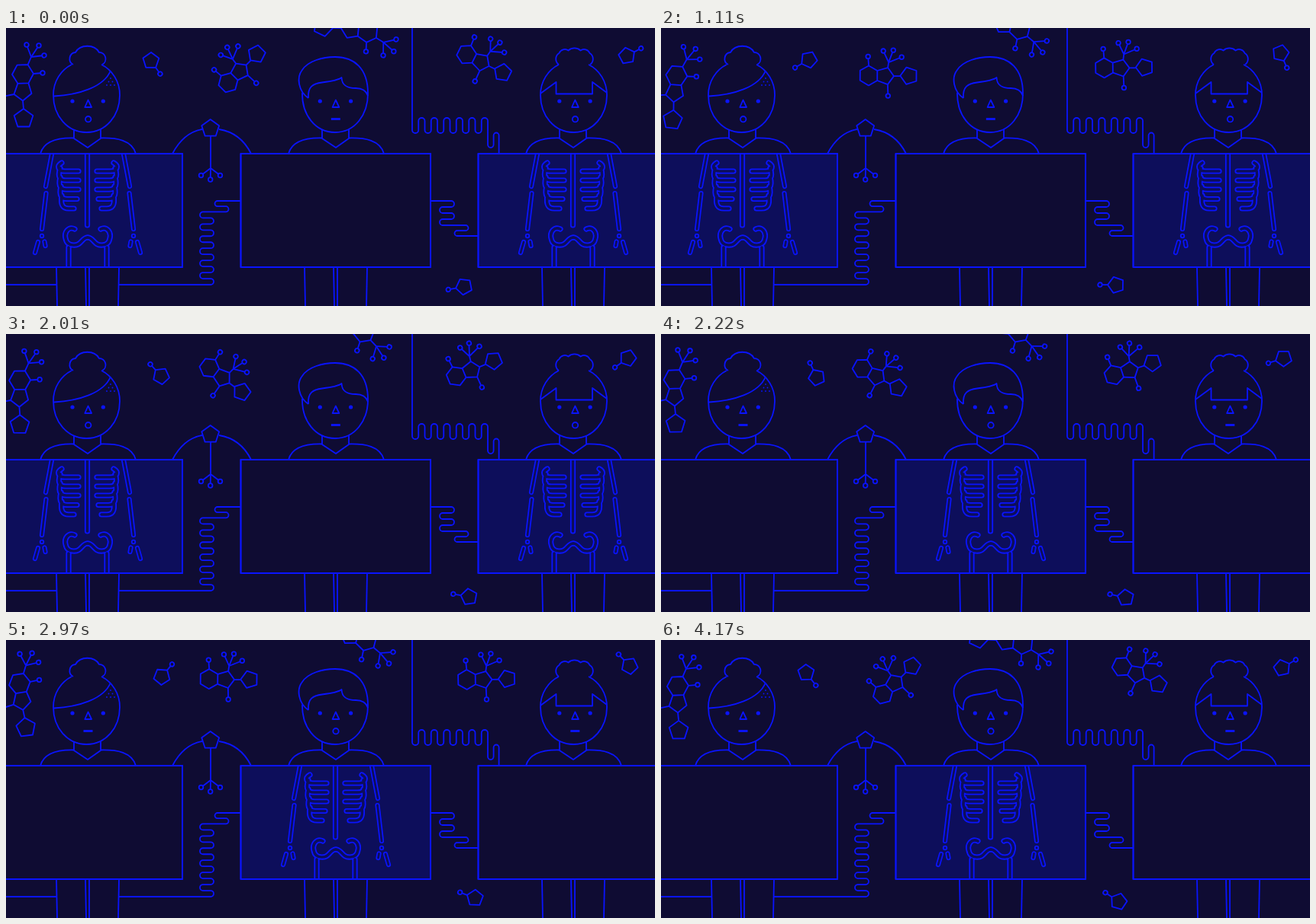
Write an HTML page that moves like this. It is 850 by 365 pixels and loops after 4200 ms.

```html
<!DOCTYPE html>
<html lang="en">
<head>
<meta charset="utf-8">
<title>X-ray line-up</title>
<style>
  html, body { margin: 0; width: 100%; height: 100%; overflow: hidden; background: #0f0c33; }
  svg {
    --ink: #0a14ff; --night: #0f0c33; --glow: #0d0e5b;
    --pane: var(--night); --on: hidden; --off: visible;
    display: block; width: 850px; height: 365px;
    fill: none; stroke: var(--ink); stroke-width: 1.8; stroke-linejoin: round;
  }
  /* custom properties reach into <use> copies, descendant selectors do not */
  .lit { --pane: var(--glow); --on: visible; --off: hidden; }
  .panel { fill: var(--pane); }
  .bones, .open { visibility: var(--on); }
  .shut { visibility: var(--off); stroke-width: 2.8; }
  .node { fill: var(--night); }
  .dot { fill: var(--ink); stroke: none; }
  .bones { stroke-linecap: round; }
  .outer { stroke-width: 7.2; }
  .inner { stroke: var(--glow); stroke-width: 3.6; }
  .fingers .outer { stroke-width: 6.2; }
  .fingers .inner { stroke-width: 2.8; }
</style>
</head>
<body>
<svg viewBox="0 0 850 365">
  <defs>
    <clipPath id="screen"><path d="M-17.5 165H231V314H-17.5Z"/></clipPath>

    <path id="ribs" d="M73 177C66 181 68 188 77 188H95
      M71 184C67 196 71 200 78 200H95M71 196C68 208 72 212 79 212H95
      M72 208C69 220 73 224.5 80 224.5H93M73 220C71 233 75 237 82 237H89"/>
    <path id="hip" d="M90 264C82 260 76 268 78 276C79 282 82 285 88 285C99 286 99 275 107 275M82 288V318"/>
    <path id="arm" d="M61 160L52 208M52.5 217L47 264"/>
    <path id="hand" d="M42 281L38 295M50.5 280.5L51.5 286"/>
    <path id="spine" d="M106.5 155V259"/>

    <g id="half">
      <use href="#ribs" class="outer"/><use href="#ribs" class="inner"/>
      <g class="fingers">
        <use href="#arm" class="outer"/><use href="#arm" class="inner"/>
        <use href="#hand" class="outer"/><use href="#hand" class="inner"/>
      </g>
      <circle cx="47" cy="273" r="2.3"/>
    </g>
    <g id="hips"><use href="#hip"/><use href="#hip" transform="matrix(-1 0 0 1 214 0)"/></g>
    <g id="skeleton" clip-path="url(#screen)">
      <use href="#half"/>
      <use href="#half" transform="matrix(-1 0 0 1 214 0)"/>
      <use href="#hips" class="outer"/><use href="#hips" class="inner"/>
      <use href="#spine" class="outer"/><use href="#spine" class="inner"/>
    </g>

    <g id="body">
      <path d="M89 133V145L107 157L124 145V133M89 144.5C70 144 50 147 45 165M124 144.5C145 144 165 147 170 165"/>
      <path d="M66 314L67 365M104 314L105 365M109 314V365M148 314L147 365"/>
      <path class="panel" d="M-17.5 165H231V314H-17.5Z"/>
      <use href="#skeleton" class="bones"/>
      <path d="M-17.5 165H231V314H-17.5Z"/>
    </g>
    <g id="face">
      <circle class="dot" cx="87" cy="96" r="2.6"/>
      <circle class="dot" cx="127.3" cy="96" r="2.6"/>
      <path d="M107.5 94.5L103.3 104H112Z"/>
      <path class="shut" d="M101.5 119.5H113.5"/>
      <circle class="open" cx="107.7" cy="119.7" r="3.7"/>
    </g>
    <path id="head" d="M86 48C72 55 62 70 62 88C62 115 80 137 105.5 137C131 137 149 115 149 88C149 70 139 55 125 48"/>
  </defs>

  <g id="molecules"></g>

  <!-- wires -->
  <path id="coil"/>
  <path id="stack"/>
  <path d="M0 337H66M307 227H277a3.5 3.6 0 0 0 0 7.2H288a3.5 3.6 0 0 1 0 7.2H258"/>
  <path d="M556 227H583a4 4 0 0 1 0 8H572a4 4 0 0 0 0 8H583a4 4 0 0 1 0 8H572a4 4 0 0 0 0 8H602a3.5 3.5 0 0 1 0 7H591a3.5 3.5 0 0 0 0 7H618"/>
  <path d="M218 165C228 146 240 136 257 133M279 133C298 136 312 147 321 165"/>
  <g id="lamp"></g>

  <!-- people -->
  <g class="side">
    <use href="#body"/>
    <use href="#head"/>
    <use href="#face"/>
    <path d="M88 48A8.5 8.5 0 0 1 91 32A17 14 0 0 1 122 32A8.5 8.5 0 0 1 126 48M63 89.5C94 88 128 78 137 56"/>
    <g id="freckles"></g>
  </g>
  <g class="middle">
    <use href="#body" x="325"/>
    <use href="#face" x="324.3"/>
    <path d="M396 92C383 83 380 65 388 55C396 43 415 38 431 38C456 38 474 53 474 86C474 114 457 137 431 137C405 137 387.5 114 388 85"/>
    <path d="M396 92C395 77 402 73 414 71.5C426 70 436 68 439.5 65C440 77 449 79 458 79C467 79 472 83 474 89"/>
  </g>
  <g class="side">
    <use href="#body" x="636"/>
    <use href="#head" x="638"/>
    <use href="#face" x="637.8"/>
    <path d="M724 48A9 9 0 0 1 724.5 33A8 8 0 0 1 736.5 29.5A12 12 0 0 1 752.5 29.5A8 8 0 0 1 764.5 33A9 9 0 0 1 765 48"/>
    <path d="M700 86L720.5 71V86.5H768V71L787 85"/>
  </g>
</svg>
<script>
const LOOP = 4200, STEP = 30, HALF = 2000;
const TIMES = [0, 540, 1110, 1680, 2220, 2970, 3540];
const $ = id => document.getElementById(id);

// ---- drawing helpers ----
const line = d => `<path d="${d}"/>`;
const node = (x, y) => `<circle class="node" cx="${x}" cy="${y}" r="2.8"/>`;
const bond = (x1, y1, x2, y2) => line(`M${x1} ${y1}L${x2} ${y2}`) + node(x2, y2);
function ring(n, cx, cy, r, deg) {
  const pts = Array.from({ length: n }, (_, i) => {
    const a = (deg + i * 360 / n) * Math.PI / 180;
    return (cx + r * Math.cos(a)).toFixed(2) + ' ' + (cy + r * Math.sin(a)).toFixed(2);
  });
  return line('M' + pts.join('L') + 'Z');
}

const chain =
  bond(0, 0, -6, -16) + bond(0, 0, 10, -15) + bond(0, 0, 17, -2) +
  line('M0 0L-4.4 10.1') + ring(6, -11, 22.5, 14, -62) + bond(3, 22, 15, 21) +
  line('M-3.6 34.4L.5 48L-11 57.5L-22.5 49L-17.6 34.9M-22.5 49L-40 52.5M-11 57.5L-10 68') +
  ring(5, -10, 81, 13, -90);

const cluster =
  ring(6, -26, 0, 13, -90) + bond(-26, -13, -27, -25) +
  line('M-14.7 -6.5L-1 -10.5L7 .5L-1 11.5L-14.7 6.5M-1 -10.5L0 -17.5M7 .5H15.5') +
  bond(0, -17.5, -7, -32.5) + bond(0, -17.5, 6, -33.5) + bond(0, -17.5, 17, -24.5) +
  bond(-1, 11.5, -0.5, 26.5) + ring(5, 27, 0, 11.7, 180);

const drop = ring(5, -5.5, 0, 11, 0) + bond(5.5, 0, 15.5, 0);

// ---- molecules: shape, x and y at TIMES, angle as straight runs between [time, degrees] ----
const swing = (a, b) => [[0, a], [HALF, b], [LOOP, a]];
const spin = (from, turn) => [[0, from], [LOOP, from + turn]];
const wander = [[193, 186, 189, 195.8, 201.7, 207.6, 200.5], [47.5, 50.4, 44.3, 48.3, 52, 43.8, 42]];
const molecules = [
  { shape: chain, x: [33, 34.2, 33.7, 31.8, 28.2, 26, 30], y: [38, 41, 41.3, 40.7, 36.9, 33.4, 34.8],
    angle: [[0, 0], [1300, 7.2], [2980, -7.2], [LOOP, 0]] },
  { shape: chain, x: [494.3, 491.5, 488.3, 485.1, 485.5, 490, 492.7], y: [18.8, 18.7, 18.2, 17.1, 15.8, 17.1, 18.1],
    angle: swing(97.7, 113.2) },
  { shape: cluster, x: [309.3, 304.8, 298, 290.2, 286.4, 292, 300.7], y: [53.3, 59, 62.6, 62.7, 57.7, 51.5, 50],
    angle: swing(-45.2, 37) },
  { shape: cluster, x: [626.5, 617.5, 606.5, 607.6, 618, 629.5, 637.2], y: [46.4, 51.4, 52, 45.9, 45.9, 51.5, 49.9],
    angle: swing(26.5, -22.7) },
  { shape: drop, x: wander[0], y: wander[1], angle: spin(55, 360) },
  { shape: drop, x: wander[0].map(v => v + 401.5), y: wander[1].map(v => v + 293), angle: spin(169, 45) },
  { shape: drop, x: [818, 816.8, 813.7, 810.7, 810.2, 813, 816.2], y: [34, 36.9, 38, 36.6, 33.5, 30.1, 30.6],
    angle: spin(-28, 360) }
];
$('molecules').innerHTML = molecules.map(m => `<g>${m.shape}</g>`).join('');
const groups = [...$('molecules').children];

// ---- static repeats ----
let coil = 'M532 0V134';
for (let i = 0; i < 6; i++) {
  coil += 'a4.125 4 0 0 0 8.25 0V122a4.125 4 0 0 1 8.25 0V' + (i < 5 ? 134 : 153);
}
$('coil').setAttribute('d', coil + 'a3.8 4 0 0 0 7.6 0V141a3.5 3.5 0 0 1 7 0V165');

let stack = 'M258 241.4';
for (let i = 0; i < 6; i++) {
  stack += 'a4 3.98 0 0 0 0 7.967H268a4 3.98 0 0 1 0 7.967H' + (i < 5 ? 258 : 148);
}
$('stack').setAttribute('d', stack);

$('lamp').innerHTML = ring(5, 267.7, 132, 12, -90) + line('M268 142V184') +
  bond(268, 184, 255.5, 193.5) + bond(268, 184, 267.7, 199) + bond(268, 184, 280.5, 193.5);

for (let row = 0; row < 3; row++) {
  for (let i = 0; i <= row; i++) {
    $('freckles').innerHTML +=
      `<circle class="dot" cx="${137 - 2.5 * row + 5 * i}" cy="${66 + 4.5 * row}" r=".9"/>`;
  }
}

// ---- motion ----
// smooth periodic curve through the values at TIMES
function curve(keys, t) {
  const n = keys.length;
  const at = i => TIMES[(i + n) % n] + Math.floor(i / n) * LOOP;
  const val = i => keys[(i + n) % n];
  const slope = i => (val(i + 1) - val(i)) / (at(i + 1) - at(i));
  const tangent = i => {
    const before = at(i) - at(i - 1), after = at(i + 1) - at(i);
    return (after * slope(i - 1) + before * slope(i)) / (before + after);
  };
  let i = n - 1;
  while (TIMES[i] > t) i--;
  const h = at(i + 1) - at(i), u = (t - at(i)) / h, v = 1 - u;
  return v * v * (1 + 2 * u) * val(i) + u * u * (3 - 2 * u) * val(i + 1) +
    h * u * v * (v * tangent(i) - u * tangent(i + 1));
}

function straight(runs, t) {
  const i = runs.findIndex(([end]) => end > t);
  const [t0, a] = runs[i - 1], [t1, b] = runs[i];
  return a + (b - a) * (t - t0) / (t1 - t0);
}

const sides = document.querySelectorAll('.side');
const middle = document.querySelector('.middle');
const start = performance.now();

function frame(now) {
  const t = Math.floor(Math.max(0, now - start) % LOOP / STEP) * STEP;
  molecules.forEach((m, i) => {
    groups[i].setAttribute('transform',
      `translate(${curve(m.x, t)} ${curve(m.y, t)}) rotate(${straight(m.angle, t)})`);
  });
  const first = t < LOOP / 2;
  sides.forEach(s => s.classList.toggle('lit', first));
  middle.classList.toggle('lit', !first);
  requestAnimationFrame(frame);
}
frame(start);
</script>
</body>
</html>
```
